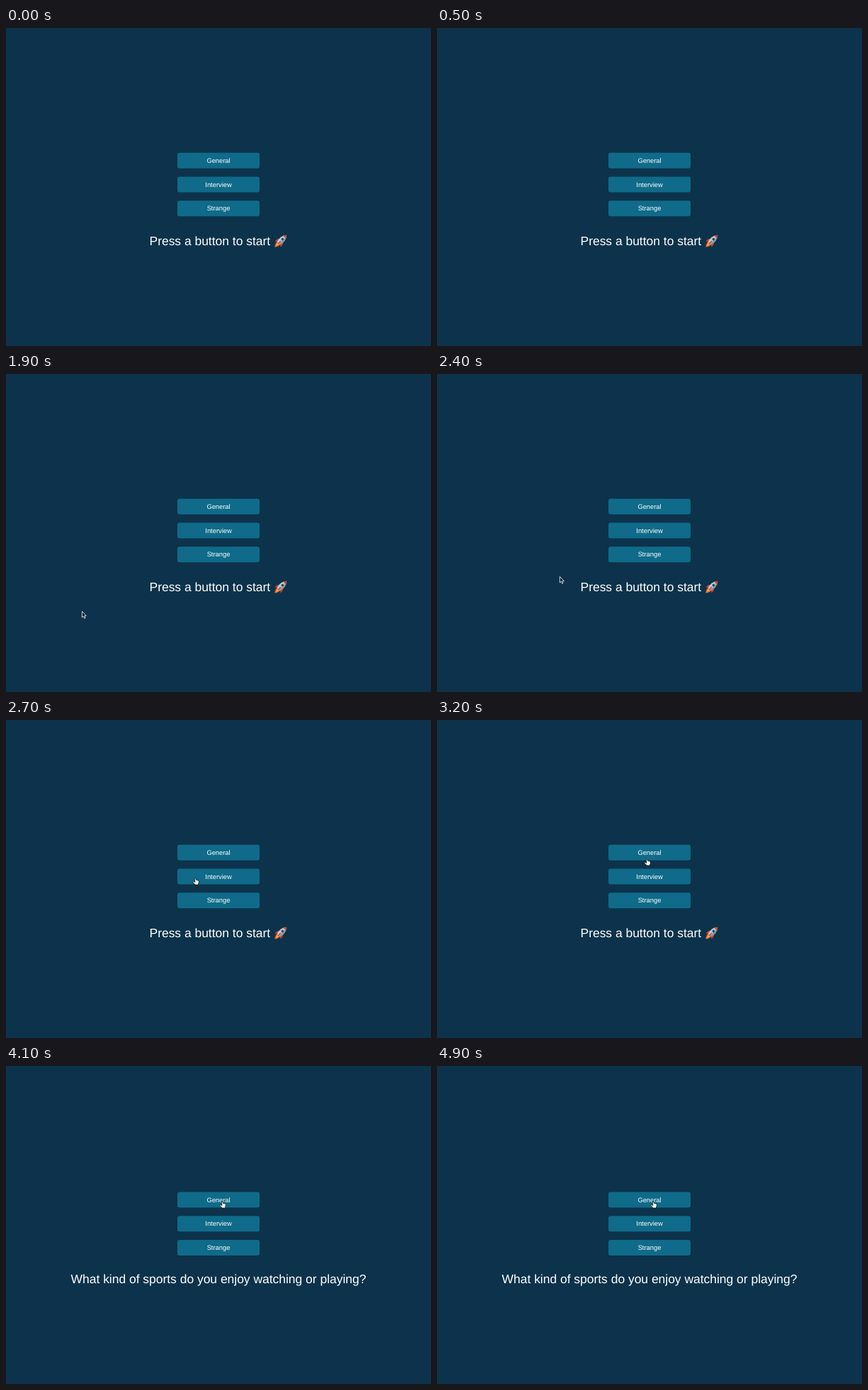
These frames come from a looping animation (600x448 px, 5 s). An HTML page:

```html
<!DOCTYPE html>
<html lang="en">
<head>
<meta charset="utf-8">
<title>Question picker</title>
<style>
  html, body { margin: 0; height: 100%; overflow: hidden; background: #0c334b; }
  svg { display: block; width: 100vw; height: 100vh; }
  text {
    font-family: "Liberation Sans", Arial, sans-serif;
    fill: #fff;
    text-rendering: geometricPrecision;
  }
  .label { font-size: 9.35px; text-anchor: middle; }
  .line { font-size: 17.45px; }
</style>
</head>
<body>
<svg viewBox="0 0 600 448">
  <g id="buttons"></g>
  <g id="prompt">
    <text class="line" x="202.5" y="306.2">Press a button to start</text>
    <g transform="translate(388 300) rotate(45)">
      <path d="M-2.6 4.5Q-3.6 8 0 12.2Q3.6 8 2.6 4.5Z" fill="#f2662b"/>
      <path d="M-1.3 4.5Q-1.6 7 0 9.4Q1.6 7 1.3 4.5Z" fill="#ffc341"/>
      <path d="M-3 -1.5Q-6.4 1 -5.6 6.4L-2.4 4ZM3 -1.5Q6.4 1 5.6 6.4L2.4 4Z" fill="#d5402f"/>
      <path d="M0 -11.6Q-6.2 -4.5 -2.5 5H2.5Q6.2 -4.5 0 -11.6Z" fill="#c3ced5"/>
      <path d="M0 -11.6Q6.2 -4.5 2.5 5H.8Q2.6 -4 0 -11.6Z" fill="#8596a1"/>
      <path d="M0 -11.6Q-2 -9.5 -2.7 -7.4H2.7Q2 -9.5 0 -11.6Z" fill="#cf4535"/>
      <circle cy="-3.4" r="1.8" fill="#263f50" stroke="#718590" stroke-width=".7"/>
      <path d="M0 0V6.2" stroke="#b83429" stroke-width="1.3"/>
    </g>
  </g>
  <text id="question" class="line" x="300" y="306.2" text-anchor="middle">What kind of sports do you enjoy watching or playing?</text>
  <g id="cursor" stroke-linejoin="round">
    <path id="arrow" d="M.4 .4V9L2.3 7.2L3.7 10.3L5 9.7L3.7 6.7H6.3Z" fill="#0b1116" stroke="#fff" stroke-width=".8"/>
    <path id="hand" d="M-.8 .4Q0 -.5 .8 .4L1.4 3.1Q2.2 2.5 2.8 3.3Q3.6 2.9 4.1 3.7Q5.2 3.4 5.3 4.8Q5.5 6.9 4.5 8.2V9.6H.2L-3 6Q-3.3 4.8 -2.2 4.8L-.1 6.1Z" fill="#fff" stroke="#10151a" stroke-width=".8"/>
  </g>
</svg>
<script>
const LOOP = 5000, STEP = 100, PRESS = 3900, RELEASE = 4000;
const TEAL = '#0f6b89', PRESSED = '#d7d6d8';
const button = { x: 242, y: 175.8, width: 116, height: 22, pitch: 33.7 };
const labels = ['General', 'Interview', 'Strange'];

// Pointer stops: time, x, y
const path = [
  [1400, 2, 401], [1600, 3, 400], [1700, 25, 387], [1900, 107, 334],
  [2100, 125, 318], [2200, 125, 318], [2300, 139, 308], [2500, 207, 262],
  [2700, 267, 222.5], [2900, 276, 215], [3200, 296, 195.5],
  [3400, 305, 190.5], [5000, 305, 190.5]
];

const byId = id => document.getElementById(id);
const show = (id, visible) => byId(id).setAttribute('display', visible ? 'inline' : 'none');

byId('buttons').innerHTML = labels.map((label, i) => {
  const y = button.y + i * button.pitch;
  return `<rect x="${button.x}" y="${y}" width="${button.width}" height="${button.height}" rx="3" fill="${TEAL}"/>
    <text class="label" x="300" y="${y + 14.1}">${label}</text>`;
}).join('');
const general = document.querySelector('rect');

function pointerAt(t) {
  const i = Math.max(1, path.findIndex(p => p[0] > t));
  const [t0, x0, y0] = path[i - 1], [t1, x1, y1] = path[i];
  const k = (t - t0) / (t1 - t0);
  return [x0 + (x1 - x0) * k, y0 + (y1 - y0) * k];
}

function overButton(x, y) {
  const row = (y - button.y) / button.pitch;
  return x >= button.x && x <= button.x + button.width &&
    row >= 0 && row < labels.length && (row % 1) * button.pitch <= button.height;
}

function draw(now) {
  const t = Math.floor(now % LOOP / STEP) * STEP;
  const asked = t >= RELEASE;
  show('prompt', !asked);
  show('question', asked);
  byId('buttons').setAttribute('transform', `translate(0 ${asked ? 1.8 : 0})`);
  general.setAttribute('fill', t >= PRESS && !asked ? PRESSED : TEAL);

  const visible = t >= path[0][0];
  show('cursor', visible);
  if (visible) {
    const [x, y] = pointerAt(t);
    const over = overButton(x, y);
    byId('cursor').setAttribute('transform', `translate(${x} ${y})`);
    show('hand', over);
    show('arrow', !over);
  }
}

const start = performance.now();
function tick() {
  draw(performance.now() - start);
  requestAnimationFrame(tick);
}
tick();
</script>
</body>
</html>
```
